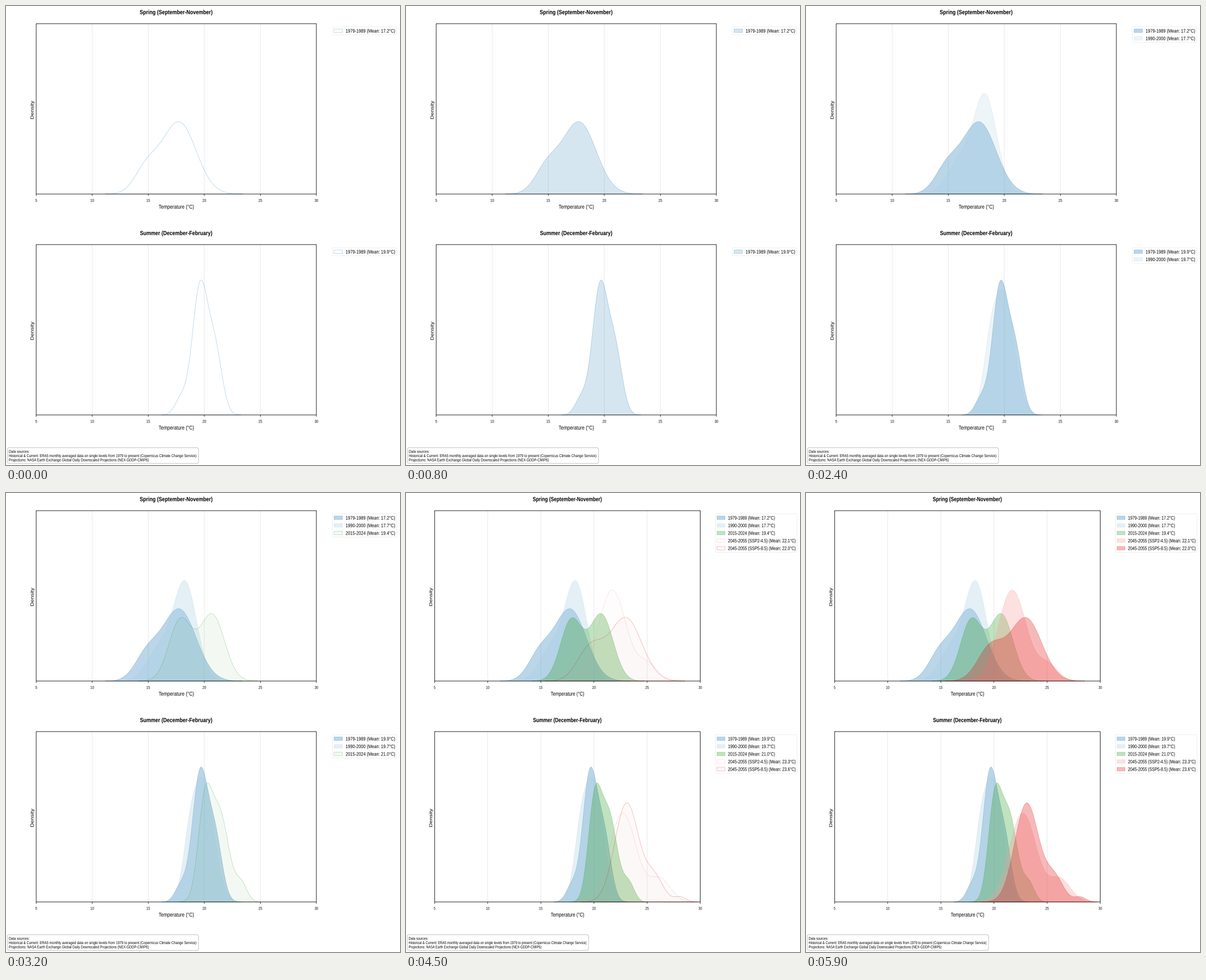
Write a matplotlib script that moves like this. It is 693 px wide and 808 px high and loops after 7.9 s.

```python
import math

import numpy as np
import matplotlib.pyplot as plt
from matplotlib.animation import FuncAnimation
from matplotlib.colors import to_rgba
from matplotlib.patches import FancyBboxPatch, PathPatch, Polygon, Rectangle
from matplotlib.textpath import TextPath
from matplotlib.transforms import Affine2D

W, H = 693, 808
PX = 0.72                      # one pixel in points at 100 dpi
PT_X, PT_Y = 0.737, 0.889      # the sheet is narrower than it is tall
LEFT, RIGHT, TOP, BASE = 53.1, 545.9, 31.1, 331.0
PANEL_STEP = 388.9
ROW = 13.4
AREA = 237                     # every density covers the same area
FADE = 15
FULL_ALPHA, EDGE_ALPHA = 0.3, 0.32
WIDE_FROM = 45
WIDE_SQUEEZE = 693 / 731


class Period:
    """A span of years: fades in from `start`, each shade kept `hold` frames.

    A season is (mean, spread of the main lobe, side lobes), where a side
    lobe is (centre, spread, share of the area).
    """

    def __init__(self, label, color, start, hold, *seasons):
        self.label, self.color = label, color
        self.start, self.hold = start, hold
        self.seasons = seasons

    def alpha(self, frame):
        age = frame - self.start
        if age >= FADE - 1:
            return FULL_ALPHA
        shade = math.ceil(self.hold * math.floor(age / self.hold))
        if shade == 0 and self.hold > 1:
            return 0.0
        return FULL_ALPHA * (shade + 1) / FADE


PERIODS = [
    Period("1979-1989", "#1f78b4", 0, 3.6,
           (17.2, 1.52, [(14.85, 1.07, 0.19)]),
           (19.9, 0.70, [(17.9, 0.53, 0.06), (21.0, 0.62, 0.27)])),
    Period("1990-2000", "#a6cee3", 15, 9,
           (17.7, 1.03, [(16.0, 1.1, 0.26)]),
           (19.7, 0.92, [(18.7, 0.62, 0.2)])),
    Period("2015-2024", "#33a02c", 30, 1.5,
           (19.4, 1.10, [(17.87, 1.02, 0.46)]),
           (20.96, 0.80, [(20.05, 0.61, 0.42), (23.3, 0.53, 0.068)])),
    Period("2045-2055 (SSP2-4.5)", "#fb9a99", 45, 1,
           (22.1, 1.31, [(25.05, 0.95, 0.115)]),
           (23.3, 1.26, [(26.2, 1.0, 0.169)])),
    Period("2045-2055 (SSP5-8.5)", "#e31a1c", 45, 1,
           (22.0, 1.50, [(19.67, 1.22, 0.3)]),
           (23.58, 1.13, [(25.7, 0.85, 0.15), (28.1, 0.55, 0.02)])),
]
TITLES = ["Spring (September-November)", "Summer (December-February)"]
NOTES = [
    "Data sources:",
    "Historical & Current: ERA5 monthly averaged data on single levels "
    "from 1979 to present (Copernicus Climate Change Service)",
    "Projections: NASA Earth Exchange Global Daily Downscaled Projections "
    "(NEX-GDDP-CMIP6)",
]

fig = plt.figure(figsize=(W / 100, H / 100), dpi=100, facecolor="white")
ax = fig.add_axes([0, 0, 1, 1])
ax.set_xlim(0, W)
ax.set_ylim(H, 0)
ax.axis("off")

squeeze = Affine2D()
sheet = squeeze + ax.transData


def add(patch, z):
    patch.set_transform(sheet)
    patch.set_zorder(z)
    ax.add_artist(patch)
    return patch


def text(x, y, s, size, align="left", weight="normal", upright=False):
    path = TextPath((0, 0), s, size=size,
                    prop={"family": "Liberation Sans", "weight": weight})
    if align == "center":
        box = path.get_extents()
        path = path.transformed(
            Affine2D().translate(-(box.x0 + box.x1) / 2, 0))
    place = Affine2D()
    if upright:
        place.rotate_deg(90)
    place.scale(PT_X, -PT_Y).translate(x, y)
    return add(PathPatch(path.transformed(place), fc="black", lw=0,
                         snap=False), 6)


def line(xs, ys, color, width, z):
    ax.plot(xs, ys, color=color, lw=width * PX, transform=sheet, zorder=z,
            solid_capstyle="butt", snap=False)


def frame_box(x, y, w, h, edge, radius, width):
    style = f"round,pad=0,rounding_size={radius}"
    return add(FancyBboxPatch((x, y), w, h, boxstyle=style, fc="white",
                              ec=edge, lw=width * PX), 4)


def x_of(temp):
    return LEFT + (temp - 5) * (RIGHT - LEFT) / 25


def density(temps, mean, spread, sides):
    """Main lobe takes the area left over and balances the mean."""
    share = 1 - sum(w for _, _, w in sides)
    centre = (mean - sum(c * w for c, _, w in sides)) / share
    return sum(AREA * w / s * np.exp(-0.5 * ((temps - c) / s) ** 2)
               for c, s, w in [(centre, spread, share), *sides])


def add_curve(season, base, color, z):
    temps = np.linspace(5, 30, 600)
    height = density(temps, *season)
    keep = height > 0.12
    xs, ys = x_of(temps[keep]), base - height[keep]
    pts = np.column_stack([np.r_[xs, xs[-1], xs[0]], np.r_[ys, base, base]])
    return add(Polygon(pts, closed=True, ec=to_rgba(color, EDGE_ALPHA),
                       lw=0.8 * PX), z)


layers = []     # (period, artist, whether it is filled)
legends = []


def build_panel(index, title):
    dy = index * PANEL_STEP
    top, base = TOP + dy, BASE + dy
    mid = (LEFT + RIGHT) / 2

    for temp in range(5, 31, 5):
        x = x_of(temp)
        if 5 < temp < 30:
            line([x, x], [top, base], "#e7e7e7", 0.9, 1)
        line([x, x], [base, base + 3.3], "black", 0.75, 5)
        text(x, dy + 344.7, str(temp), 8, "center")
    add(Rectangle((LEFT, top), RIGHT - LEFT, base - top, fc="none",
                  ec="black", lw=0.85 * PX, snap=False), 5)

    text(mid - 0.3, dy + 14.4, title, 12, "center", "bold")
    text(mid, dy + 356.7, "Temperature (°C)", 11, "center")
    text(48.6, dy + 182.8, "Density", 11, "center", upright=True)

    legends.append(frame_box(574, dy + 36.8, 113, ROW, "#ececec", 1.5, 0.8))
    for k, period in enumerate(PERIODS):
        season = period.seasons[index]
        curve = add_curve(season, base, period.color, 2 + 0.1 * k)
        y = dy + 43.5 + ROW * k
        key = add(Rectangle((577, y - 3), 14.8, 6.2, snap=False,
                            ec=to_rgba(period.color, EDGE_ALPHA),
                            lw=0.8 * PX), 5)
        name = text(597.3, y + 3.3,
                    f"{period.label} (Mean: {season[0]:.1f}°C)", 10)
        layers.extend([(period, curve, True), (period, key, True),
                       (period, name, False)])


for n, heading in enumerate(TITLES):
    build_panel(n, heading)

frame_box(2.4, 777.6, 336.3, 27.6, "#bdbdbd", 3, 0.9)
for n, note in enumerate(NOTES):
    text(4.9, 786.6 + 7.45 * n, note, 8)


def draw(i):
    wide = i >= WIDE_FROM
    squeeze.clear().scale(WIDE_SQUEEZE if wide else 1, 1)

    for period, artist, filled in layers:
        shown = i >= period.start
        artist.set_visible(shown)
        if shown and filled:
            artist.set_facecolor(to_rgba(period.color, period.alpha(i)))

    rows = sum(i >= p.start for p in PERIODS)
    for box in legends:
        box.set_width(151.5 if wide else 113)
        box.set_height(ROW * rows + 0.6)
    return []


anim = FuncAnimation(fig, draw, frames=79, interval=100, repeat=True,
                     repeat_delay=0, blit=False)
plt.show()
```
